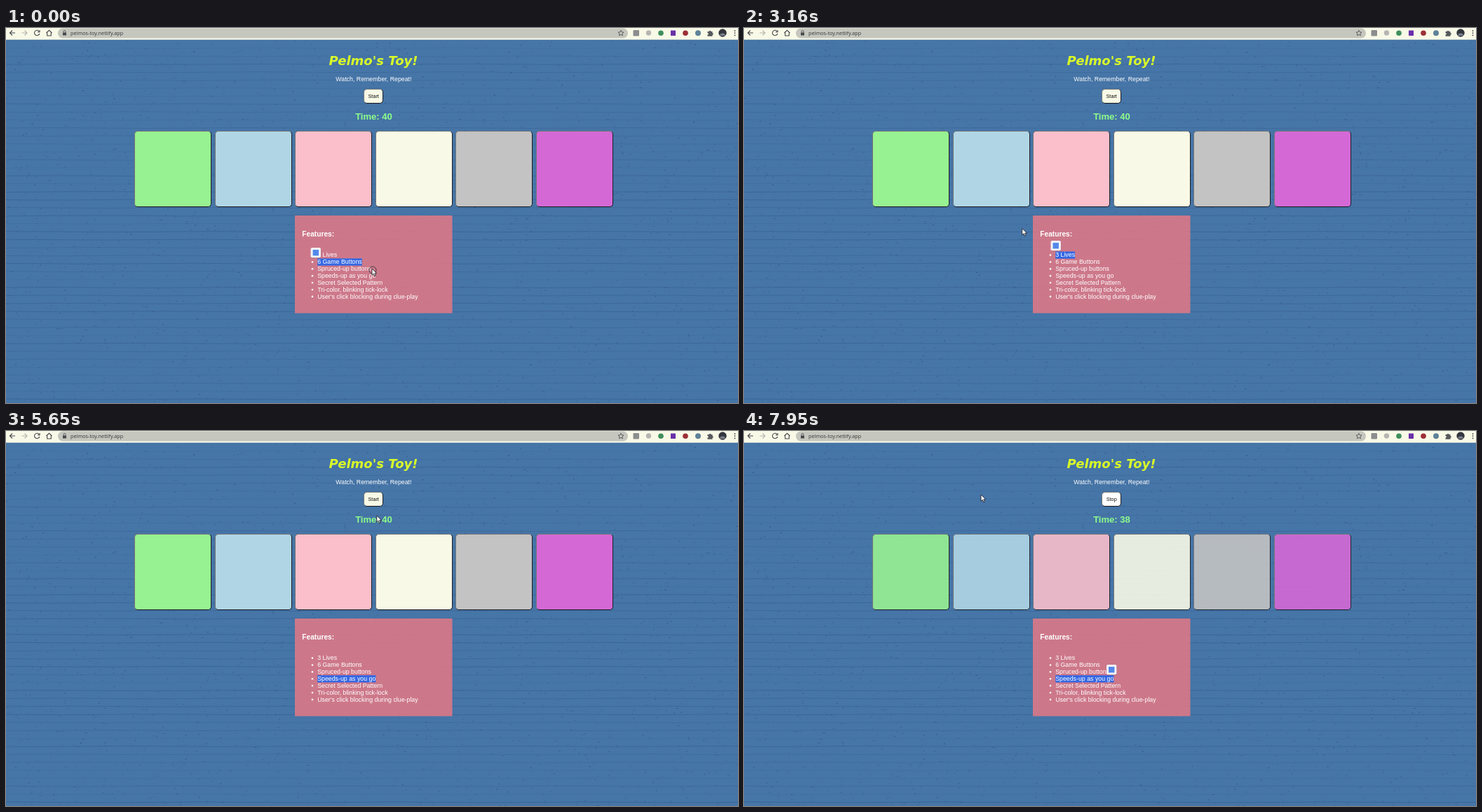
Recreate the animation shown at these times as an HTML page with a canvas. Size 1044x536 px, loop 8 s.

```html
<!DOCTYPE html>
<html lang="en">
<head>
<meta charset="utf-8">
<title>Pelmo's Toy</title>
<style>
  html, body { margin: 0; width: 100%; height: 100%; overflow: hidden; background: #4675a7; }
  canvas, svg, .pad { position: absolute; left: 0; top: 0; }
  .pad {
    box-sizing: border-box; border: 1px solid; border-color: #777 #1c1c22 #1c1c22 #777; border-radius: 5px;
    width: 110px; height: 109px; top: 147px;
  }
  #start { left: 510px; top: 87px; width: 28px; height: 21px; }
  text { font-family: "Liberation Sans", Arial, sans-serif; fill: #fff; }
  .mid { text-anchor: middle; }
  .line { fill: none; stroke: #45474a; stroke-width: 1.1; }
  #doodles { fill: none; stroke: #a095b4; stroke-width: .8; }
</style>
</head>
<body>
<canvas id="wood" width="1044" height="536"></canvas>
<div id="pads"></div>
<div id="start" class="pad"></div>
<svg width="1044" height="536" viewBox="0 0 1044 536">
  <defs><clipPath id="pad2"><rect x="299" y="148" width="107" height="107" rx="4"/></clipPath></defs>

  <!-- browser bar -->
  <rect width="1044" height="16.7" fill="#f8f9e7"/>
  <rect x="74" y=".5" width="813" height="14" rx="7" fill="#c5c6bd"/>
  <path class="line" d="M13 7H5.5M9 3.5 5.5 7 9 10.5M47 4.5a3.7 3.7 0 1 0 .8 3.5M48 3v2.6h-2.6M57.5 7 61.5 3.3 65.5 7M58.7 6.5v4.5h5.6V6.5"/>
  <path class="line" style="stroke:#b3b4ac" d="M22.5 7H30M26.5 3.5 30 7 26.5 10.5"/>
  <path d="M81 6.5h5v4h-5z" fill="#45474a"/>
  <path class="line" style="stroke-width:.8" d="M82 6.5V5a1.5 1.5 0 0 1 3 0V6.5M877 3.2l1.2 2.6 2.8.3-2.1 1.9.6 2.8-2.5-1.4-2.5 1.4.6-2.8-2.1-1.9 2.8-.3z"/>
  <text x="92" y="9.8" style="font:7.3px 'Open Sans',sans-serif;fill:#35363a">pelmos-toy.netlify.app</text>
  <rect x="894.5" y="3" width="8.5" height="8.5" rx="1" fill="#8b8d8e"/>
  <circle cx="916.5" cy="7" r="3.7" fill="#b5b6b2"/>
  <circle cx="934" cy="7.2" r="3.8" fill="#3f8f5c"/>
  <rect x="948" y="3.5" width="7" height="7.5" fill="#6a2fa8"/>
  <circle cx="969" cy="7.3" r="3.8" fill="#9c2f35"/>
  <circle cx="987" cy="7.2" r="4" fill="#5f8299"/>
  <path d="M1000.5 5h2.3a1.3 1.3 0 0 1 2.6 0h2.1v2.2a1.3 1.3 0 0 1 0 2.6v2h-7V9.5a1.3 1.3 0 0 0 0-2.6z" fill="#55585b"/>
  <circle cx="1022" cy="7" r="5.7" fill="#33363d"/>
  <path d="M1018 11a4 3.5 0 0 1 8 0" fill="#777d88"/>
  <path d="M1039.5 4v7" stroke="#45474a" stroke-width="1.8" stroke-linecap="round" stroke-dasharray="0 3.2"/>

  <!-- page -->
  <text class="mid" x="524" y="52.6" style="font:italic bold 18px 'DejaVu Sans',sans-serif;fill:#d9fb28">Pelmo's Toy!</text>
  <text class="mid" x="524.4" y="75.6" font-size="8.8">Watch, Remember, Repeat!</text>
  <text class="mid" id="label" x="524.2" y="100.2" font-size="7.3" style="fill:#111"></text>
  <text class="mid" id="time" x="524.5" y="131.3" font-size="13.05" font-weight="bold" style="fill:#8dfc8b"></text>

  <g id="doodles" clip-path="url(#pad2)">
    <path id="heart" d="M313.5 175C307 171 303 166 304.500 161.500c2-4 7-3 8 .8 1.500-4.300 7-5.300 8.500-1.300 1.500 5-3 10-7.500 14z"/>
    <use href="#heart" x="-9" y="84"/>
    <path d="M348 167h10q2 5-2 8.500h-6q-4-3.500-2-8.500zM348.500 167q4-4 9 0M353 164v-1.700M348 169c-4-1-4 4 .5 4M358.500 171c2 0 1-3 3-3.500M349.500 176.500h7"/>
    <path d="M383.500 149.500l10-3 1.500 7-8.500 3.500zM385 153l9-3"/>
    <path d="M386.500 194v-8a3.500 3.500 0 0 1 7 0v7.500zM389 194.200v4.500h2v-4.700M388.500 186v5M391.300 185.500v5"/>
    <circle cx="321.300" cy="206.500" r="8.300"/>
    <path d="M315.500 207.500h11.500q-1 6-5.500 6t-6-6M316 204.500q1.500-2.500 3.500-.5M323 203.500q2-2 3.500.5"/>
    <path d="M353.500 215.500l14.500 1.500-8 6.500zM360 223.500l-1.500 7.500M355.500 230.500l6.500 1M362 220l5-6"/>
    <circle cx="367.500" cy="214.500" r="2"/>
    <path d="M381.500 235.500q-2-2.500 2-2.500l13 3.500q3 1.500 1.500 4l-16.500-4.500zM380.500 237.500l18 5M380.500 239.500q0 3 3 4l11 3q4 .5 4-2.500z"/>
    <path d="M335.500 258q-1-5 3-5 1-3.500 5.500-3t4.500 3q4 0 3.500 5"/>
  </g>

  <rect x="412" y="268" width="224.5" height="139.6" fill="rgba(239,122,132,.8)"/>
  <text x="422.3" y="297.6" font-size="10.2" font-weight="bold">Features:</text>
  <rect id="selection" height="10.2" fill="#3468e4"/>
  <g id="features"></g>

  <circle id="ring" r="5" cx="1" cy="2" fill="none" stroke="#33343c" stroke-width=".9"/>
  <path id="cursor" d="M0 0V9.300L2.200 7.300 3.800 10.800 5.300 10.100 3.800 6.700H6.700Z" fill="#fff" stroke="#15151c" stroke-width=".8"/>
  <g id="popup">
    <rect x=".4" y=".7" width="14.4" height="14.4" rx="2.2" fill="#7d4c62" opacity=".45"/>
    <rect width="14.4" height="14.2" rx="2" fill="#f3f4f8"/>
    <rect x="3" y="3" width="8.4" height="8.4" fill="#5388ea"/>
  </g>
</svg>
<script>
const $ = id => document.getElementById(id);
const LOOP = 8000;
const CAPTURE_STEP = 135; // the pointer moves in visible steps
const PLAY = 5920, CLUE_ON = 6990, CLUE_OFF = 7950;
const TEXT_LEFT = 444.2;
const COLORS = ["#97f291", "#b0d6e6", "#fabfcb", "#f8f9e6", "#c3c3c3", "#d469d6"];
const ROWS = ["3 Lives", "6 Game Buttons", "Spruced-up buttons", "Speeds-up as you go",
  "Secret Selected Pattern", "Tri-color, blinking tick-lock", "User's click blocking during clue-play"];
const rowY = i => 324.3 + 9.88 * i;

// turning points of the pointer: time, x, y
const pointerKeys = [
  [0, 522, 344], [660, 440, 338], [1080, 442, 326], [1320, 475, 319], [1590, 472, 319],
  [1980, 440, 318], [2490, 452, 299], [3100, 397, 286], [3230, 391, 300], [3400, 461, 347],
  [3940, 533, 352], [4090, 533, 352], [4590, 436, 352], [4720, 441, 351], [5130, 481, 265],
  [5530, 529, 122], [5650, 524.5, 98], [6040, 524.5, 98], [6560, 338, 91]
];
// each drag marks a row from its end back to its start, then a popup opens
const drags = [
  { row: 1, press: -500, release: 0, clear: 120, popup: { at: 0, x: 434.6, y: 314 } },
  { row: 2, press: 0, release: 600, clear: 1470, popup: { at: 930, x: 437.8, y: 324 } },
  { row: 0, press: 1590, release: 1980, clear: 4090, popup: { at: 2370, x: 437.5, y: 304 } },
  { row: 3, press: 4090, release: 4590, clear: LOOP, popup: { at: PLAY, x: 517, y: 334 } }
];

const progress = (t, from, to) => Math.min(1, Math.max(0, (t - from) / (to - from)));
const show = (id, visible) => { $(id).style.display = visible ? "" : "none"; };
const move = (id, x, y) => $(id).setAttribute("transform", `translate(${x} ${y})`);

function pointerAt(t) {
  const next = pointerKeys.findIndex(key => key[0] > t);
  if (next < 0) return pointerKeys.at(-1).slice(1);
  const [t0, x0, y0] = pointerKeys[next - 1];
  const [t1, x1, y1] = pointerKeys[next];
  const p = progress(t, t0, t1);
  return [x0 + (x1 - x0) * p, y0 + (y1 - y0) * p];
}

function drawWood() {
  const ctx = $("wood").getContext("2d");
  let seed = 11;
  const random = () => (seed = seed * 16807 % 2147483647) / 2147483647;
  ctx.fillStyle = "#4675a7";
  ctx.fillRect(0, 0, 1044, 536);
  ctx.lineWidth = 0.8;
  for (let y = 29; y < 536; y += 11.4) {
    ctx.strokeStyle = `rgba(32,64,112,${0.1 + 0.25 * random()})`;
    const phase = random() * 6;
    ctx.beginPath();
    for (let x = 0; x <= 1044; x += 12) ctx.lineTo(x, y + 0.4 * Math.sin(x / 44 + phase));
    ctx.stroke();
  }
  for (let i = 0; i < 2600; i++) {
    ctx.fillStyle = `rgba(30,58,104,${0.12 + 0.4 * random()})`;
    ctx.fillRect(random() * 1044, 18 + random() * 518, 0.6 + 1.6 * random(), 0.6 + 0.6 * random());
  }
}

function build() {
  drawWood();
  $("pads").innerHTML = COLORS.map((_, i) => `<div class="pad" style="left:${183 + 114.5 * i}px"></div>`).join("");
  $("features").innerHTML = ROWS.map((row, i) =>
    `<circle cx="437" cy="${rowY(i) + 0.3}" r="1.3" fill="#fff"/>
     <text x="${TEXT_LEFT}" y="${rowY(i) + 3}" font-size="8.8">${row}</text>`).join("");
}

function renderGame(t) {
  const playing = t >= PLAY;
  const clue = t >= CLUE_ON && t < CLUE_OFF;
  [...$("pads").children].forEach((pad, i) => {
    const lit = clue && i === 1;
    pad.style.backgroundColor = lit ? "#3200f5" : COLORS[i];
    pad.style.opacity = playing && !lit ? 0.9 : 1;
  });
  show("doodles", clue);
  $("start").style.backgroundColor = playing ? "#fff" : "#f8f9e6";
  $("label").textContent = playing ? "Stop" : "Start";
  $("time").textContent = "Time: " + (40 - (t >= CLUE_ON) - (t >= CLUE_OFF));
}

function renderPointer(t) {
  const stepped = Math.floor(t / CAPTURE_STEP) * CAPTURE_STEP;
  const [x, y] = pointerAt(stepped);
  move("cursor", x, y);
  move("ring", x, y);
  show("ring", drags.some(drag => t >= drag.press && t < drag.press + 120));

  const { row, press, release, popup } = drags.find(drag => t < drag.clear);
  const length = $("features").querySelectorAll("text")[row].getComputedTextLength();
  const width = length * progress(stepped, press, release);
  $("selection").setAttribute("width", width);
  $("selection").setAttribute("x", TEXT_LEFT + length - width);
  $("selection").setAttribute("y", rowY(row) - 4.8);
  show("popup", t >= popup.at);
  move("popup", popup.x, popup.y);
}

function tick() {
  const t = performance.now() % LOOP;
  renderGame(t);
  renderPointer(t);
  requestAnimationFrame(tick);
}

build();
tick();
</script>
</body>
</html>
```
